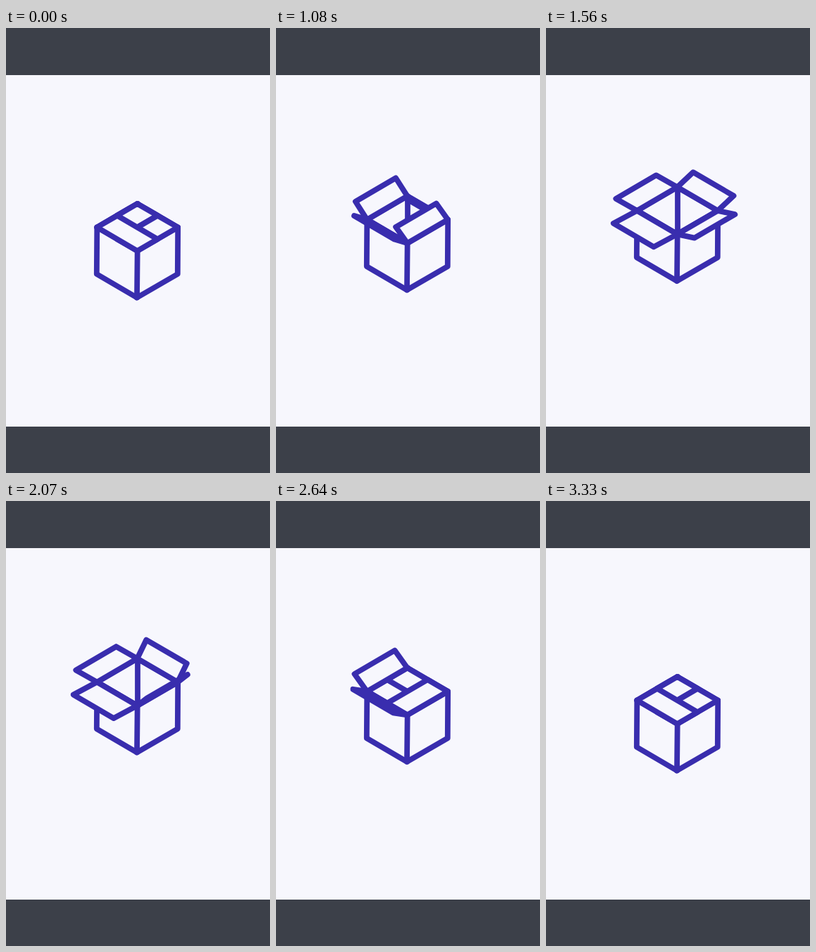
These frames come from a looping animation (375 by 633 pixels, 3.66 s). An HTML page:

```html
<!DOCTYPE html>
<html lang="en">
<head>
<meta charset="utf-8">
<title>Box</title>
<style>
  html, body { margin: 0; width: 100%; height: 100%; overflow: hidden; background: #f7f7fd; }
  svg { display: block; width: 375px; height: 633px; }
  .ink { stroke: #392dae; stroke-width: 7.8; stroke-linejoin: round; stroke-linecap: round; fill: #f7f7fd; }
</style>
</head>
<body>
<svg viewBox="0 0 375 633">
  <rect width="375" height="633" fill="#f7f7fd"/>
  <rect width="375" height="67" fill="#3c4049"/>
  <rect y="567" width="375" height="66" fill="#3c4049"/>
  <g id="box" class="ink">
    <path d="M186.5 250L244 283.5L186.5 317L129.3 283.5Z"/>
    <path d="M187 250V317"/>
    <path id="backRight"/>
    <path id="backLeft"/>
    <path d="M129.3 283.5L186.5 317L244.2 283.5L243.8 350L186 383.5L128.8 350Z"/>
    <path d="M186.7 317L186 383.5"/>
    <path id="frontRight"/>
    <path id="frontLeft"/>
  </g>
</svg>
<script>
const LOOP = 3660;
const BACK = [186.5, 250], RIGHT = [244, 283.5], FRONT = [186.5, 317], LEFT = [129.3, 283.5];

// Times at which a flap is: closed, upright, open, open, upright, closed.
const LEFT_TIMES = [450, 925, 1215, 2520, 2805, 3110];
const RIGHT_TIMES = [850, 1370, 1640, 1920, 2190, 2610];
const STAGES = [0, 1, 2, 2, 1, 0];

// Each pose is the offset from the hinge to the outer edge: closed, upright, open.
const flaps = [
  { id: "backRight", hinge: [BACK, RIGHT], times: RIGHT_TIMES, poses: [[-28.7, 16.7], [0, -33.5], [30, -17]] },
  { id: "backLeft", hinge: [LEFT, BACK], times: LEFT_TIMES, poses: [[28.7, 16.7], [0, -36.5], [-30, -17]] },
  { id: "frontRight", hinge: [RIGHT, FRONT], times: RIGHT_TIMES, poses: [[-28.7, -16.7], [0, -31.5], [32.5, 17.5]] },
  { id: "frontLeft", hinge: [FRONT, LEFT], times: LEFT_TIMES, poses: [[28.7, -16.7], [0, -34], [-33.5, 18]] }
];
for (const flap of flaps) flap.path = document.getElementById(flap.id);
const box = document.getElementById("box");

const mix = (a, b, k) => a + (b - a) * k;
const ease = u => (u + u * u * (3 - 2 * u)) / 2;

function stageAt(t, times) {
  if (t <= times[0]) return 0;
  const i = times.findIndex(time => t < time);
  if (i < 0) return 0;
  const u = (t - times[i - 1]) / (times[i] - times[i - 1]);
  return mix(STAGES[i - 1], STAGES[i], ease(u));
}

function drawFlap({ path, hinge: [a, b], times, poses }, t) {
  const stage = stageAt(t, times);
  const i = Math.min(1, Math.floor(stage));
  const [dx, dy] = [0, 1].map(axis => mix(poses[i][axis], poses[i + 1][axis], stage - i));
  const points = [a, b, [b[0] + dx, b[1] + dy], [a[0] + dx, a[1] + dy]];
  path.setAttribute("d", "M" + points.map(p => p.join(" ")).join("L") + "Z");
}

function render(t) {
  const u = Math.min(1, Math.max(0, (t - 450) / 2880));
  const lift = 13.5 * (1 - Math.cos(2 * Math.PI * u));
  box.setAttribute("transform", `translate(0 ${-lift})`);
  for (const flap of flaps) drawFlap(flap, t);
}

const start = performance.now();
function tick() {
  render((performance.now() - start) % LOOP);
  requestAnimationFrame(tick);
}
render(0);
requestAnimationFrame(tick);
</script>
</body>
</html>
```
